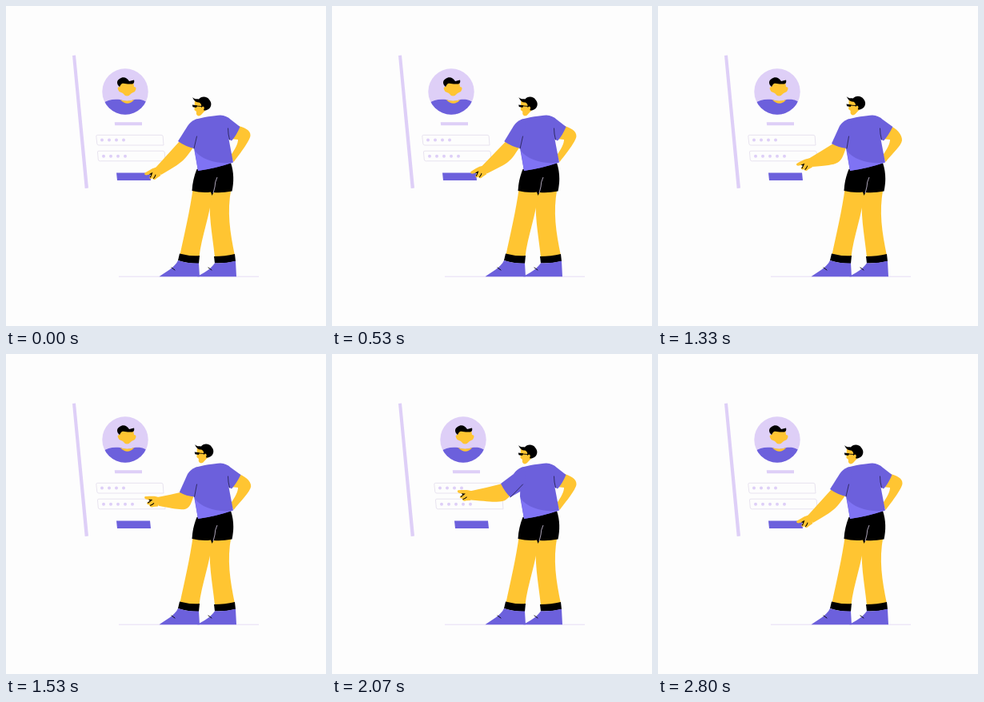
An HTML page that plays this animation: 400 by 400 pixels, repeating every 2870 ms.

```html
<!DOCTYPE html>
<html lang="en">
<head>
<meta charset="utf-8">
<title>Login panel</title>
<style>
  html, body { margin: 0; width: 100%; height: 100%; overflow: hidden; background: #fdfdfd; }
  svg { display: block; width: 100%; height: 100%; }
  .skin { fill: #ffc532; }
  .ink { fill: #000; }
  .cloth { fill: #6c60dc; }
  .pale { fill: #decff7; }
  .line { fill: none; stroke: #000; stroke-width: .9; stroke-linecap: round; }
  .fold { fill: none; stroke: #2a2456; stroke-width: .9; stroke-linecap: round; }
  .field { fill: none; stroke: #e6e0ee; stroke-width: .9; }
</style>
</head>
<body>
<svg viewBox="0 0 400 400">
  <clipPath id="round"><circle cx="149" cy="107" r="28.7"/></clipPath>
  <path class="pale" d="M83 62L87 61.500L103 227.500L98.700 228Z"/>
  <path d="M141 338.200H316" stroke="#e4daf4" stroke-width=".9"/>

  <g id="panel">
    <circle class="pale" cx="149" cy="107" r="28.700"/>
    <g clip-path="url(#round)">
      <path class="cloth" d="M119 123C126 117 134 116 143 117Q151 121 160 117C168 116 173 117 179 123V138H119Z"/>
      <path class="skin" d="M142.500 117Q151 120 160.500 117Q152 126.500 142.500 117Z"/>
    </g>
    <path class="skin" d="M143 95L159 94L160 101Q164.500 101 161 107L157 109Q151 116 146 109L141.500 107Q137.500 101 142 101Z"/>
    <path class="ink" d="M142 101C138 98 138 93 142 91C146 88 151 89 154 94L160 92.500C161 96 159 98 156 97.500C151 98 148 96 145 97C143 98 143 100 142 101Z"/>
    <path class="pale" d="M135.700 145.300H170V149.300H136.200Z"/>
    <path class="field" d="M114.500 161.300H194Q196 161.300 196.200 163L197 174H116Q114 174 113.800 172L112.800 163Q112.700 161.300 114.500 161.300Z"/>
    <path class="field" d="M116 181.200H196Q198 181.200 198.200 183L199 193.800H117.500Q115.500 193.800 115.300 192L114.500 183Q114.300 181.200 116 181.200Z"/>
    <g id="dots" class="pale"></g>
    <path class="cloth" d="M138 208.500H180L181 218H139Z"/>
  </g>

  <g id="legs">
    <path class="skin" d="M256 228H281.500C276 258 280 282 286 312L261 314C258 284 252 260 256 228Z"/>
    <path class="skin" d="M234 226L258 230C256 260 244 288 241.500 314L217.500 311C223 285 230 256 234 226Z"/>
    <path class="ink" d="M217 309.500Q230 313 242 312L241 322Q227 322 215 318Z"/>
    <path class="ink" d="M260 313Q274 313 286 310L287 319Q274 322 261 321.500Z"/>
    <path class="cloth" d="M215 318Q227 322 241 321.500L242 338.300H191.500C200 332 211 327 215 318Z"/>
    <path class="cloth" d="M261 321.300Q274 322 287 318.800L288 338.300H239C247 334 256 329 261 321.300Z"/>
    <path class="line" d="M207 327L211 330M253 327L257 330"/>
    <path class="ink" d="M238.500 204L281 196C285 208 285 220 282.500 231.500Q270 234 259.500 233L257.500 237L256 232.500Q245 234 232.500 231C233 221 235 213 238.500 204Z"/>
    <path d="M264 214Q261 220 261 226L259 234" fill="none" stroke="#d9cfe8" stroke-width=".8"/>
  </g>

  <path id="restArm" class="skin"/>
  <path id="arm" class="skin"/>
  <g id="hand">
    <path class="skin" d="M2 -5C-4 -6 -8 -4 -15 -1.500Q-16.500 0 -14 1.200L-8 1L-11 4.500Q-11 7 -8 6L-7 7.500Q-5 9 -3 7L2 5Z"/>
    <path class="ink" d="M-10.500 .7L-6 -.5L-7.500 2L-9.500 5L-10.500 4.500L-8.500 2Z"/>
    <path class="line" d="M-3.500 3Q-4.500 5 -6.500 6.500"/>
  </g>
  <path id="shirt" class="cloth"/>
  <path fill="#7f73f4" d="M236 181C245 193 266 198 283.500 195.500Q262 203 240 206Z"/>
  <path id="sleeve" class="cloth"/>
  <path id="fold" class="fold"/>
  <path class="fold" d="M277.500 153Q277.500 160 279.500 167"/>
  <g id="head">
    <path class="skin" d="M236 117L235.500 130L238 132C237 137 241 139 244 136C246 134 247 132 249 131L251 121Z"/>
    <path class="ink" d="M233 114C236 117 238 116 241 116.500C244 112 252 113 254 117C258 121 257 128 251 130Q248 131 247 130Q249 126 246 125.500L244 127C245 123 243 121 241 120.500Q236 121 233 114Z"/>
    <path class="ink" d="M232.800 123.500L239 124.300L238 127L233.500 126.200Z"/>
    <path class="line" d="M238 125L245 125.500"/>
  </g>
</svg>
<script>
const LOOP = 2870, STEP = LOOP / 43;
const $ = id => document.getElementById(id);
const set = (id, name, value) => $(id).setAttribute(name, value);

// Pose: elbow x y, wrist x y, hand angle, sleeve corners x y x y, lean, resting elbow x y
const press = [221, 195, 190, 207, -12, 215, 169, 235, 178, 1, 305.5, 160];
const lift = [227, 197, 190, 200, -8, 217, 173, 236, 178, 0, 305, 166];
const peak = [228, 198, 190, 196.500, -8, 217, 172, 236, 178, .1, 305, 166];
const raise = [228, 194, 187, 174, 50, 216, 173, 234, 179, 0, 308, 160];
const reach = [214, 186, 173, 177, 18, 211, 162, 223, 179, 1, 305.5, 161];
const poses = [[0, press], [70, press], [270, lift], [335, peak], [600, press], [1070, press],
  [1330, peak], [1800, raise], [2070, reach], [2670, press], [LOOP, press]];
const slides = [[0, [0]], [1600, [0]], [1800, [-8]], [2070, [15]], [2600, [0]], [LOOP, [0]]];

// Monotone cubic through the keys, resting at turning points
function sample(keys, t) {
  let i = 0;
  while (i < keys.length - 2 && t >= keys[i + 1][0]) i++;
  const span = keys[i + 1][0] - keys[i][0], u = (t - keys[i][0]) / span;
  return keys[i][1].map((a, k) => {
    const b = keys[i + 1][1][k];
    const secant = j => keys[j] && keys[j + 1]
      ? (keys[j + 1][1][k] - keys[j][1][k]) / (keys[j + 1][0] - keys[j][0]) : 0;
    const slope = j => {
      const p = secant(j - 1), q = secant(j);
      return p * q > 0 ? 2 * p * q / (p + q) : 0;
    };
    const ease = u * u * (3 - 2 * u);
    return a + (b - a) * ease
      + span * (slope(i) * u * (1 - u) ** 2 - slope(i + 1) * u * u * (1 - u));
  });
}

for (const [y, x0, count] of [[167.500, 120, 4], [187.700, 122, 5]])
  for (let i = 0; i < count; i++)
    $('dots').insertAdjacentHTML('beforeend', `<circle cx="${x0 + 9 * i}" cy="${y}" r="2"/>`);
const lastDot = $('dots').lastElementChild;

function draw(t) {
  const [ex, ey, wx, wy, angle, ax, ay, bx, by, lean, restX, restY] = sample(poses, t);
  const dx = wx - (ax + bx) / 2, dy = wy - (ay + by) / 2, len = Math.hypot(dx, dy);
  const nx = -dy / len, ny = dx / len;
  const side = (x, y, w) => `${x + nx * w} ${y + ny * w}`;
  set('arm', 'd', `M${ax + 2} ${ay}Q${side((ax + wx) / 2, (ay + wy) / 2, 2)} ${side(wx, wy, 5.5)}`
    + `L${side(wx, wy, -5.5)}C${ex} ${ey} ${ex} ${ey} ${bx - 1} ${by - 1}L240 160Z`);
  set('hand', 'transform', `translate(${wx} ${wy}) rotate(${angle}) scale(1.1)`);
  set('sleeve', 'd', `M241 141C233 142 230 146 227 150L${ax} ${ay}`
    + `Q${(ax + bx) / 2 - 1} ${(ay + by) / 2 + 2} ${bx} ${by}L242 168Z`);
  set('fold', 'd', `M238.500 163L${bx} ${by}`);

  const shift = 2 * (1 - lean);
  set('shirt', 'd', `M236 142C246 139 260 137 268 136.500Q276 137 281 142L${292.5 + shift / 2} 151`
    + `Q288 162 282 168.500L278.500 166.500L284 195.500Q262 203 240 206L235 178Z`);
  set('restArm', 'd', `M288 149C298 152 ${restX + .5} ${restY - 5} ${restX} ${restY + 2}`
    + `C${restX - 1} ${restY + 9} 293 184 284.500 195L281 187C286 179 290 173 290 167L280 166Z`);
  set('head', 'transform', `translate(${1.5 * shift} ${-shift / 2})`);
  set('panel', 'transform', `translate(${sample(slides, t)[0]} 0)`);
  lastDot.style.visibility = t < STEP / 2 ? 'hidden' : 'visible';
}

function frame(now) {
  draw(Math.floor((now % LOOP) / STEP + .1) % 43 * STEP);
  requestAnimationFrame(frame);
}
draw(0);
requestAnimationFrame(frame);
</script>
</body>
</html>
```
